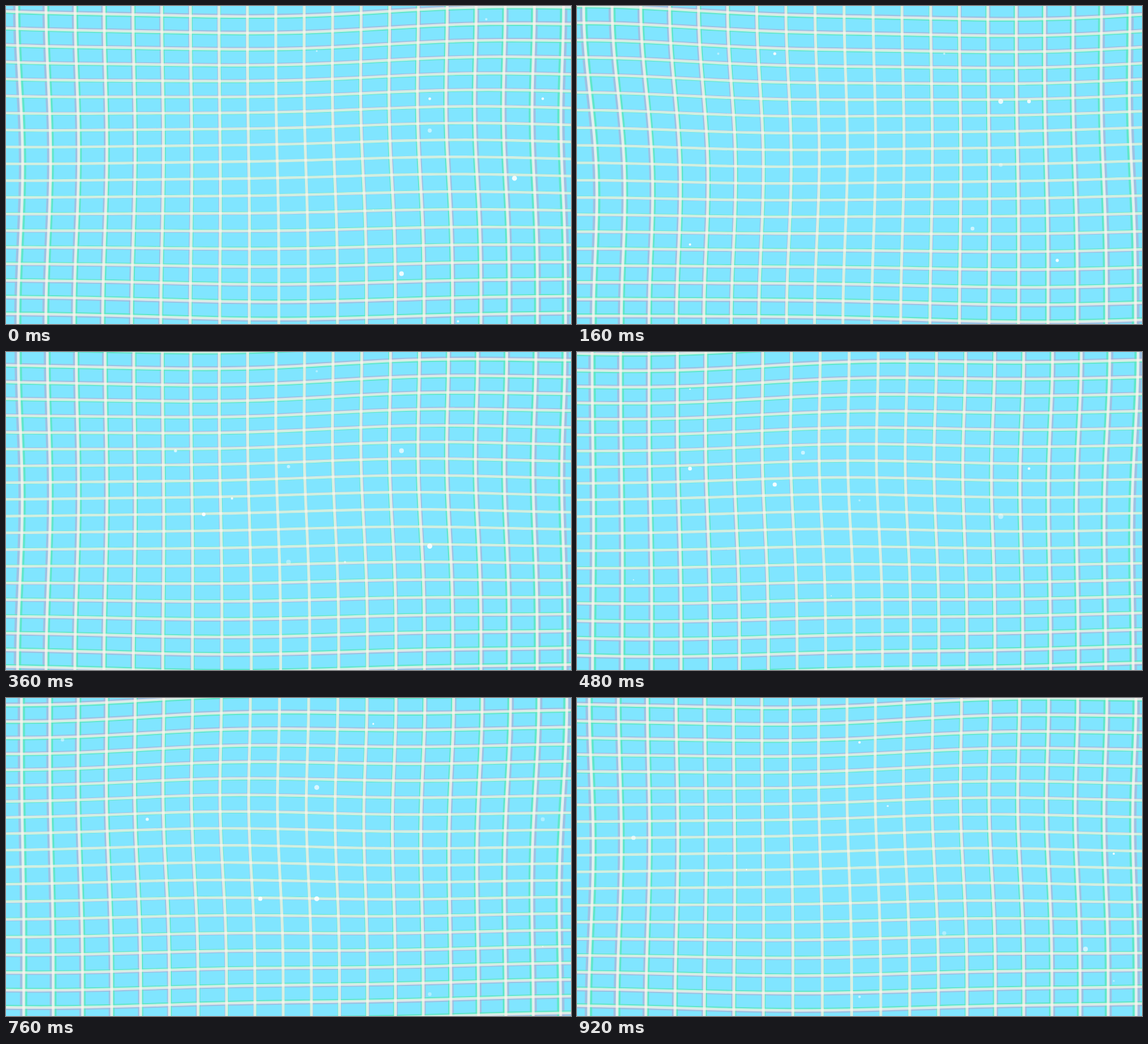
Animation, 960 px wide and 540 px high, one loop 960 ms. Source, as an HTML page:

```html
<!DOCTYPE html>
<html lang="en">
<head>
<meta charset="utf-8">
<title>Warped grid</title>
<style>
html, body { margin: 0; width: 100%; height: 100%; overflow: hidden; background: #80e5ff; }
svg { display: block; width: 960px; height: 540px; }
path { fill: none; }
</style>
</head>
<body>
<svg id="stage" viewBox="0 0 960 540"></svg>
<script>
const W = 960, H = 540, LOOP = 960, STEP = 40;
const COL = 48, ROW = 28.5, CELL = 27, SPAN = 2 * W;
const svg = document.getElementById('stage');

function add(tag, attrs) {
  const el = document.createElementNS('http://www.w3.org/2000/svg', tag);
  for (const k in attrs) el.setAttribute(k, attrs[k]);
  return svg.appendChild(el);
}

// Amplitudes of standing waves: row m, column n is cos(m·y)·cos(n·x).
const swayX = [
  [5.6, -4.5, -2.1, 2.4, -0.3, 1],
  [-0.9, -3.9, 2.8, -3.5, -2.1, -0.6],
  [-0.1, -4.6, -1.3, -0.5],
  [0.3, -0.2, -0.7, 0.5]
];
const swayY = [
  [-0.9, 4.5, -2.6, -2.3, -1.8, 0.5, 0, -1.2],
  [-1.7, -0.4, 0.1, -2.1, -1.5, -0.1, -0.5, -0.5],
  [1, 0.7, -3.7, -0.9, 0.7, 0.5]
];

function sway(waves, x, y) {
  const u = Math.PI * x / SPAN, v = Math.PI * y / H;
  let sum = 0;
  waves.forEach((amps, m) => {
    const cy = Math.cos(m * v);
    amps.forEach((a, n) => { sum += a * cy * Math.cos(n * u); });
  });
  return sum;
}

// Tinted layers are scaled about the centre, so they part towards the edges.
const layers = [
  { scale: 1.009, color: '#a9b4d8', rowAlpha: 0.7, colAlpha: 0.72 },
  { scale: 0.992, color: '#58e8bf', rowAlpha: 0.8, colAlpha: 0.8 },
  { scale: 1, color: '#fff5ee', rowAlpha: 0.7, colAlpha: 0.75 }
].map(l => {
  const pen = (width, alpha) =>
    add('path', { stroke: l.color, 'stroke-opacity': alpha, 'stroke-width': width });
  return { scale: l.scale, rows: pen(4.4, l.rowAlpha), cols: pen(4.8, l.colAlpha) };
});

function trace(lines, scale) {
  const place = (v, size) => (size / 2 + (v - size / 2) * scale).toFixed(2);
  return lines.map(pts =>
    'M' + pts.map(([x, y]) => place(x, W) + ' ' + place(y, H)).join('L')).join('');
}

// The rows fall one place per loop; the sway slides across and back.
function drawGrid(turn) {
  const slide = SPAN * Math.abs(turn);
  const cols = [], rows = [];
  for (let i = 0; i < 20; i++) {
    const x = COL * (i + 0.5), pts = [];
    for (let y = -20; y <= H + 20; y += 20)
      pts.push([x + sway(swayX, x + slide, y), y]);
    cols.push(pts);
  }
  for (let j = -1; j < 20; j++) {
    const y = 12 + ROW * (j + turn), pts = [];
    for (let x = -20; x <= W + 20; x += 20)
      pts.push([x, y + sway(swayY, x + slide, y)]);
    rows.push(pts);
  }
  for (const l of layers) {
    l.cols.setAttribute('d', trace(cols, l.scale));
    l.rows.setAttribute('d', trace(rows, l.scale));
  }
}

function random(seed) {
  let s = seed;
  return () => (s = (s * 16807) % 2147483647) / 2147483647;
}

const dots = Array.from({ length: 9 }, () => add('circle', { fill: '#fff' }));

// New sparkles on every step, on a lattice that falls one cell per loop.
function drawDots(step, turn) {
  const rnd = random(7919 * (step + 1));
  const shift = (turn + 1) % 1;
  rnd();
  for (const dot of dots) {
    dot.setAttribute('cx', COL * (1 + Math.floor(rnd() * 19)));
    dot.setAttribute('cy', CELL * (Math.floor(rnd() * 20) + shift));
    dot.setAttribute('r', (1 + rnd() * 3.5).toFixed(2));
    dot.setAttribute('fill-opacity', (0.95 - 0.6 * rnd() ** 2).toFixed(2));
  }
}

let shown = -1;
function render(ms) {
  const step = Math.floor((ms % LOOP) / STEP);
  if (step === shown) return;
  shown = step;
  let turn = (step * STEP - 160) / LOOP;
  if (turn >= 0.5) turn -= 1;
  drawGrid(turn);
  drawDots(step, turn);
}

let start = null;
function tick(now) {
  if (start === null) start = now;
  render(Math.max(0, now - start));
  requestAnimationFrame(tick);
}
render(0);
requestAnimationFrame(tick);
</script>
</body>
</html>
```
